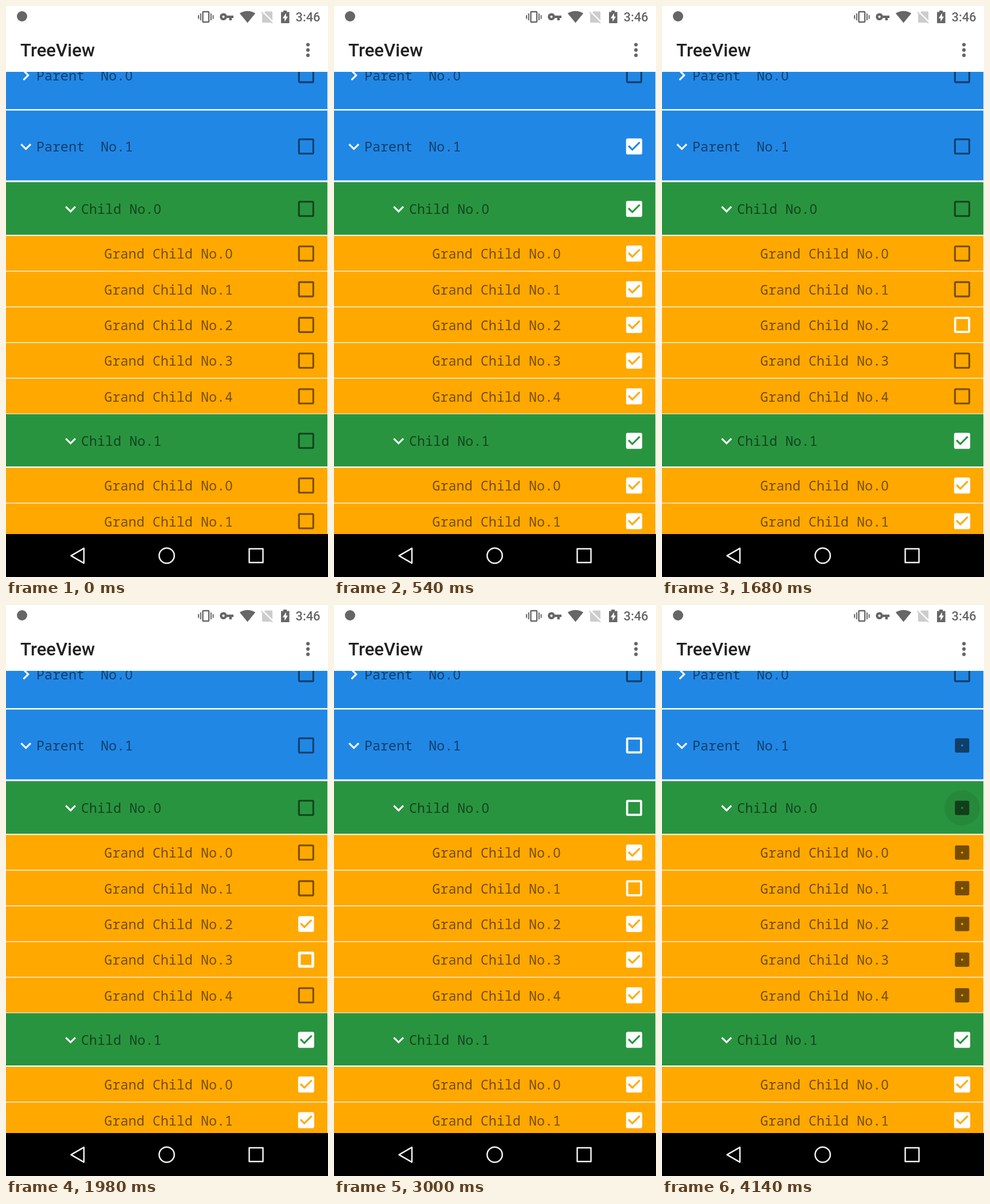
An HTML page that plays this animation: 562x997 px, repeating every 4200 ms.

```html
<!DOCTYPE html>
<html lang="en">
<head>
<meta charset="utf-8">
<title>TreeView</title>
<style>
html, body { margin: 0; width: 100%; height: 100%; overflow: hidden; background: #fff; }
svg { display: block; width: 100vw; height: 100vh; }
.ui { font-family: Roboto, sans-serif; font-weight: 500; }
.mono { font: 23.4px "Noto Sans Mono", "DejaVu Sans Mono", monospace; fill: #000; fill-opacity: .54; white-space: pre; }
.mono.thin { font-weight: 300; }
.zero { font-family: "Noto Sans", "Open Sans", sans-serif; }
</style>
</head>
<body>
<svg id="stage" viewBox="0 0 562 997">
  <rect width="562" height="997" fill="#fff"/>
  <g id="list"></g>
  <rect width="562" height="115" fill="#fff"/>
  <g fill="#666">
    <circle cx="28" cy="18" r="9"/>
    <rect x="343.5" y="10" width="10.5" height="18" rx="1" fill="none" stroke="#666" stroke-width="2.4"/>
    <path d="M339.7 13v12M336 16v6.500M357.800 13v12M361.500 16v6.500" stroke="#666" stroke-width="2"/>
    <path fill-rule="evenodd" d="M379.500 12.500a6.300 6.300 0 1 0 5.900 8.400h4.200v4.200h4.400v-4.200h3v-4.200h-11.600a6.300 6.300 0 0 0-5.900-4.200zm0 4.200a2.100 2.100 0 1 1 0 4.200 2.100 2.100 0 0 1 0-4.200z"/>
    <path d="M421.500 29.500L407.800 12.800Q421.500 4.500 435.200 12.800Z"/>
    <path d="M452.500 9.500H463.500Q465 9.500 465 11V27.500Q465 29 463.500 29H448.500Q447 29 447 27.500V15.500Z" fill="#ccc"/>
    <path d="M446.500 8.500L467 29" stroke="#fff" stroke-width="2.500"/>
    <path d="M445.500 10.500L465 30" stroke="#ccc" stroke-width="2"/>
    <path d="M484 10.500V8h6v2.500h4.500V30H480V10.500Z"/>
    <path d="M488.800 12.500L482.800 21.500H486.300V27.500L492 18.500H488.800Z" fill="#fff"/>
    <text class="ui" x="505.500" y="26.600" font-size="21.85">3:46</text>
    <circle cx="527" cy="67.500" r="3.100"/>
    <circle cx="527" cy="76.800" r="3.100"/>
    <circle cx="527" cy="86.100" r="3.100"/>
  </g>
  <text class="ui" x="25" y="88" font-size="31.2" fill="#212121">TreeView</text>
  <rect y="922" width="562" height="75" fill="#000"/>
  <g fill="none" stroke="#f2f2f2" stroke-width="2.500" stroke-linejoin="round">
    <path d="M113.500 959.800L136 946.800V972.800Z"/>
    <circle cx="280.500" cy="959.800" r="13.200"/>
    <rect x="424.500" y="947.800" width="24" height="24"/>
  </g>
</svg>
<script>
const LOOP = 4200, STEP = 60, BOX_X = 523.8;
const SIDE = 28.1, HOLE = 21.9, SHRINK = 0.11;
const TICK = [[-9.8, -1.1], [-3.1, 5.6], [9.8, -7.3]];

const kinds = {
  parent: { color: '#2187e5', x: 53, arrow: 34.7 },
  child: { color: '#29943f', x: 131, arrow: 112.7 },
  grand: { color: '#ffa800', x: 171.5 }
};

// Each event is [time, checked, tapped directly]
const allOn = [170, true], allOff = [1060, false], lastOn = [2985, true], endOff = [4060, false];
const tapped = e => [...e, true];
const grand = (n, top, time) => ({
  kind: 'grand', label: 'Grand Child No.' + n, top, bottom: top + 61, mid: top + 30.9,
  events: time ? [allOn, allOff, [time, true, true], endOff] : [allOn]
});
const firstTop = 401.4, pitch = 62.3;
const rows = [
  { kind: 'parent', label: 'Parent  No.0', top: 58, bottom: 180, mid: 120.6, closed: true, events: [] },
  { kind: 'parent', label: 'Parent  No.1', top: 182.5, bottom: 304.5, mid: 245.2, events: [allOn, allOff, lastOn, endOff] },
  { kind: 'child', label: 'Child No.0', top: 307.5, bottom: 399.5, mid: 354.3, events: [allOn, tapped(allOff), lastOn, tapped(endOff)] },
  ...[2650, 2985, 1665, 1950, 2210].map((time, n) => grand(n, firstTop + n * pitch, time)),
  { kind: 'child', label: 'Child No.1', top: 712.6, bottom: 804, mid: 759.2, events: [allOn] },
  grand(0, 806.3), grand(1, 806.3 + pitch)
];

function add(parent, tag, attrs, text) {
  const el = document.createElementNS('http://www.w3.org/2000/svg', tag);
  for (const k in attrs) el.setAttribute(k, attrs[k]);
  if (text) el.textContent = text;
  parent.appendChild(el);
  return el;
}

const ramp = (x, a, b) => Math.min(1, Math.max(0, (x - a) / (b - a)));
const easeOut = (x, power) => 1 - Math.pow(1 - x, power);

function build(row) {
  const list = document.getElementById('list');
  const { color, x, arrow } = kinds[row.kind];
  add(list, 'rect', { y: row.top, width: 561, height: row.bottom - row.top, fill: color });
  if (arrow) {
    add(list, 'path', {
      d: 'M-8.3 -4.2L0 4.1L8.3 -4.2', fill: 'none', stroke: '#fff', 'stroke-width': 3.1,
      transform: `translate(${arrow} ${row.mid + 0.3})` + (row.closed ? ' rotate(-90)' : '')
    });
  }
  const zero = row.label.endsWith('0');
  const base = row.mid + 9;
  const css = row.kind === 'parent' ? 'mono thin' : 'mono';
  const text = add(list, 'text', { class: css, x, y: base }, zero ? row.label.slice(0, -1) : row.label);
  // The list typeface has a plain, unslashed zero
  if (zero) add(text, 'tspan', { class: 'zero', dx: 0.3 }, '0');

  row.ripple = add(list, 'circle', { cx: BOX_X, cy: row.mid, r: 31 });
  const box = add(list, 'g', {});
  row.box = box;
  row.frame = add(box, 'path', { 'fill-rule': 'evenodd' });
  row.tick = add(box, 'path', { fill: 'none', stroke: color, 'stroke-width': 3.1 });
}

function framePath(hole) {
  const a = SIDE / 2, r = 3.1, s = SIDE - 2 * r, h = hole / 2;
  const arc = (dx, dy) => `a${r} ${r} 0 0 1 ${dx} ${dy}`;
  let d = `M${r - a} ${-a}h${s}${arc(r, r)}v${s}${arc(-r, r)}h${-s}${arc(-r, -r)}v${-s}${arc(r, -r)}z`;
  if (h > 2.5) d += `M${-h} ${-h}h${hole}v${hole}h${-hole}z`;
  else if (h > 0) d += `M0 ${-h - 1}L${h + 1} 0L0 ${h + 1}L${-h - 1} 0z`;
  return d;
}

function tickPath(grow, center) {
  if (grow <= 0) return '';
  return 'M' + TICK.map(p => p.map((v, i) => center[i] + (v - center[i]) * grow).join(' ')).join('L');
}

function pose(on, e) {
  if (on) return {
    hole: HOLE * (1 - Math.pow(ramp(e, 0, 130), 1.3)),
    scale: 1 - SHRINK * (ramp(e, 40, 130) - ramp(e, 200, 340)),
    tick: tickPath(easeOut(ramp(e, 170, 340), 2.2), TICK[1])
  };
  return {
    hole: HOLE * easeOut(ramp(e, 60, 330), 2),
    scale: 1 - SHRINK * (ramp(e, 20, 80) - ramp(e, 180, 330)),
    tick: tickPath(1 - ramp(e, 25, 75), [0, 0])
  };
}

function drawBox(row, t) {
  const [start, on, tap] = row.events.filter(e => e[0] <= t).pop() || [-1e4, false];
  const e = t - start, p = pose(on, e);
  row.box.setAttribute('transform', `translate(${BOX_X} ${row.mid}) scale(${p.scale})`);
  row.frame.setAttribute('d', framePath(p.hole));
  row.frame.setAttribute('fill', on ? '#fff' : '#000');
  row.frame.setAttribute('fill-opacity', on ? 1 : 0.54);
  row.tick.setAttribute('d', p.tick);
  const glow = tap ? ramp(e, 30, 80) * (1 - ramp(e, 210, 345)) : 0;
  row.ripple.setAttribute('fill', on ? '#fff' : '#000');
  row.ripple.setAttribute('fill-opacity', 0.075 * glow);
}

function render(t) {
  rows.forEach(row => drawBox(row, t));
}

rows.forEach(build);
render(0);
const origin = performance.now();
function tick() {
  const t = (performance.now() - origin) % LOOP;
  render(Math.floor(t / STEP) * STEP);
  requestAnimationFrame(tick);
}
requestAnimationFrame(tick);
</script>
</body>
</html>
```
